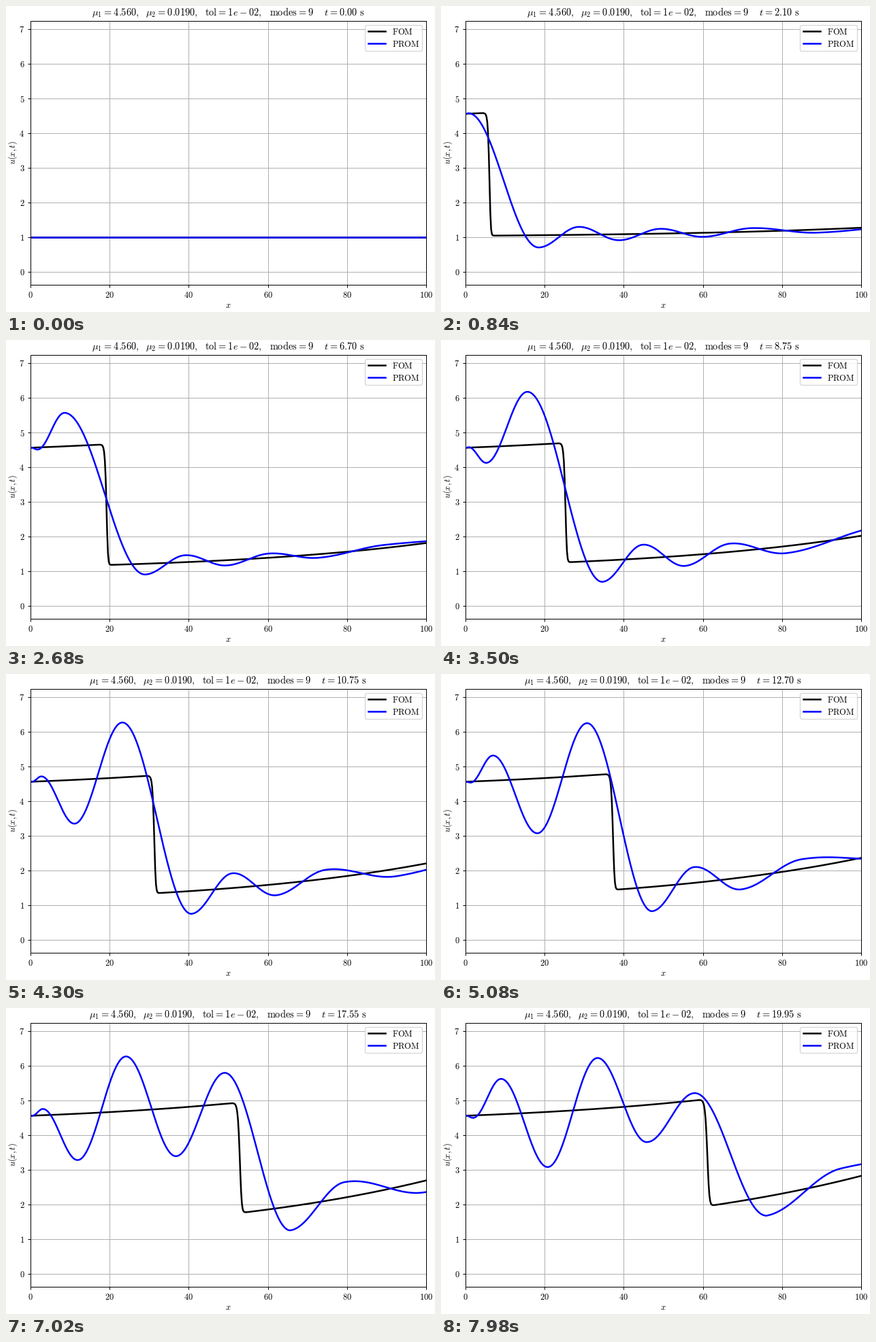
A matplotlib script that plays this animation: 630x450 px, repeating every 8000 ms.

```python
import math
import numpy as np
import matplotlib.pyplot as plt
from matplotlib.animation import FuncAnimation
from matplotlib.patches import FancyBboxPatch

plt.rcParams["mathtext.fontset"] = "cm"

W, H, DPI = 630, 450, 90
FRAMES, DT, SUBSTEPS = 400, 0.05, 4
MU1, MU2 = 4.56, 0.019
N = 512
X = np.linspace(0, 100, N)


def burgers(inflow):
    """Implicit upwind solution of u_t + u u_x = 0.02 exp(MU2 x), u(x, 0) = 1."""
    dt = DT / SUBSTEPS
    a = dt / (X[1] - X[0])
    gain = (dt * 0.02 * np.exp(MU2 * X)).tolist()
    u = [1.0] * N
    rows = [u]
    for _ in range(FRAMES - 1):
        for _ in range(SUBSTEPS):
            new = [inflow]
            for i in range(1, N):
                rhs = u[i] + gain[i] + a / 2 * new[-1] ** 2
                new.append((math.sqrt(1 + 2 * a * rhs) - 1) / a)
            u = new
        rows.append(u)
    return np.array(rows)


FOM = burgers(MU1)
AHEAD = burgers(1.0)  # smooth state in front of the shock


def swing(x, nodes):
    """Half-cosine arcs through the nodes."""
    px, py = np.array(nodes).T
    k = np.clip(np.searchsorted(px, x, side="right") - 1, 0, len(px) - 2)
    s = np.clip((x - px[k]) / (px[k + 1] - px[k]), 0, 1)
    return py[k] + (py[k + 1] - py[k]) * (1 - np.cos(np.pi * s)) / 2


def inlet_waves(t):
    """Crests and troughs sent out at the inlet by turns, newest first."""
    nodes = [(0, MU1)]
    for n in reversed(range(7)):
        age = t - 5 - 3.28 * n
        x = 6 * math.log1p(math.exp(age * (4.1 - 0.015 * age) / 6))
        amp = 1.62 * (1 - math.exp(-(x / 9) ** 2)) * (1 - (x / 60) ** 4)
        steady = math.sqrt(MU1 ** 2 + 0.04 / MU2 * (math.exp(MU2 * x) - 1))
        nodes.append((x, steady + (-1) ** n * amp))
    return nodes


def ripples(t):
    """Fading ripples in front of the shock, as offsets from the smooth state."""
    amp = np.interp(t, [0, 2, 4.3, 6.7, 8.3, 16, 20], [.76, .35, .41, .31, .6, .78, .55])
    x, n = 14.7 + 1.64 * t + 0.072 * t * t, 1
    nodes = []
    while not nodes or nodes[-1][0] < 100:
        nodes.append((x, (-1) ** n * amp * (1.5 / (n + 0.5)) ** 0.85))
        x, n = x + 10.2 + 10 * (x / 78) ** 6, n + 1
    return nodes


def prom(i):
    if i == 0:
        return np.ones(N)
    base = AHEAD[i]
    front = ripples(i * DT)
    foot, offset = front[0]
    back = inlet_waves(i * DT) + [(foot, np.interp(foot, X, base) + offset)]
    return np.where(X < foot, swing(X, back), base + swing(X, front))


fig = plt.figure(figsize=(W / DPI, H / DPI), dpi=DPI, facecolor="white")
ax = fig.add_axes([36.1 / W, 40 / H, 580.8 / W, 387.8 / H])
ax.set_xlim(0, 100)
ax.set_ylim(-0.3704, 7.2305)
ax.set_xticks(range(0, 101, 20), [f"${v}$" for v in range(0, 101, 20)])
ax.set_yticks(range(8), [f"${v}$" for v in range(8)])
ax.grid(True)
fom_line, = ax.plot(X, FOM[0], color="black", lw=2)
prom_line, = ax.plot(X, FOM[0], color="blue", lw=2)

# Overlay in pixel units for the texts and the legend
over = fig.add_axes([0, 0, 1, 1])
over.set_xlim(0, W)
over.set_ylim(H, 0)
over.axis("off")


def write(x, y, s, size=10, **kw):
    return over.text(x, y, s, fontsize=size, **kw)


write(326.5, 444, "$x$", ha="center")
write(10.5, 216, "$u(x,t)$", ha="center", va="center", rotation=90)
over.add_patch(FancyBboxPatch((527.5, 28.5), 84, 38, boxstyle="round,pad=0,rounding_size=2.5",
                              fc="white", ec="0.8", lw=1, alpha=.8))
for y, color, name in ((37.4, "black", "FOM"), (55, "blue", "PROM")):
    over.plot([532, 557], [y, y], color=color, lw=2)
    write(567, y + 4.5, rf"$\mathrm{{{name}}}$")

EQ = r"\hspace{0.04}=\hspace{0.04}"
HEAD = [
    (126, rf"$\mu_1{EQ}4.560,$"),
    (205, rf"$\mu_2{EQ}0.0190,$"),
    (291.5, rf"$\mathrm{{tol}}{EQ}1e-02,$"),
    (387, rf"$\mathrm{{modes}}{EQ}9$"),
    (467, ""),
]
head = [write(x, 14, s, 11.5) for x, s in HEAD]


def draw(i):
    t = i * DT
    fom_line.set_ydata(FOM[i])
    prom_line.set_ydata(prom(i))
    shift = 4 if t >= 10 else 0  # the centred title grows by one digit
    for text, (x, _) in zip(head, HEAD):
        text.set_x(x - shift)
    head[-1].set_text(rf"$t{EQ}{t:.2f}\ \mathrm{{s}}$")
    return [fom_line, prom_line, *head]


anim = FuncAnimation(fig, draw, frames=FRAMES, interval=20, repeat=True, repeat_delay=0, blit=False)
plt.show()
```
